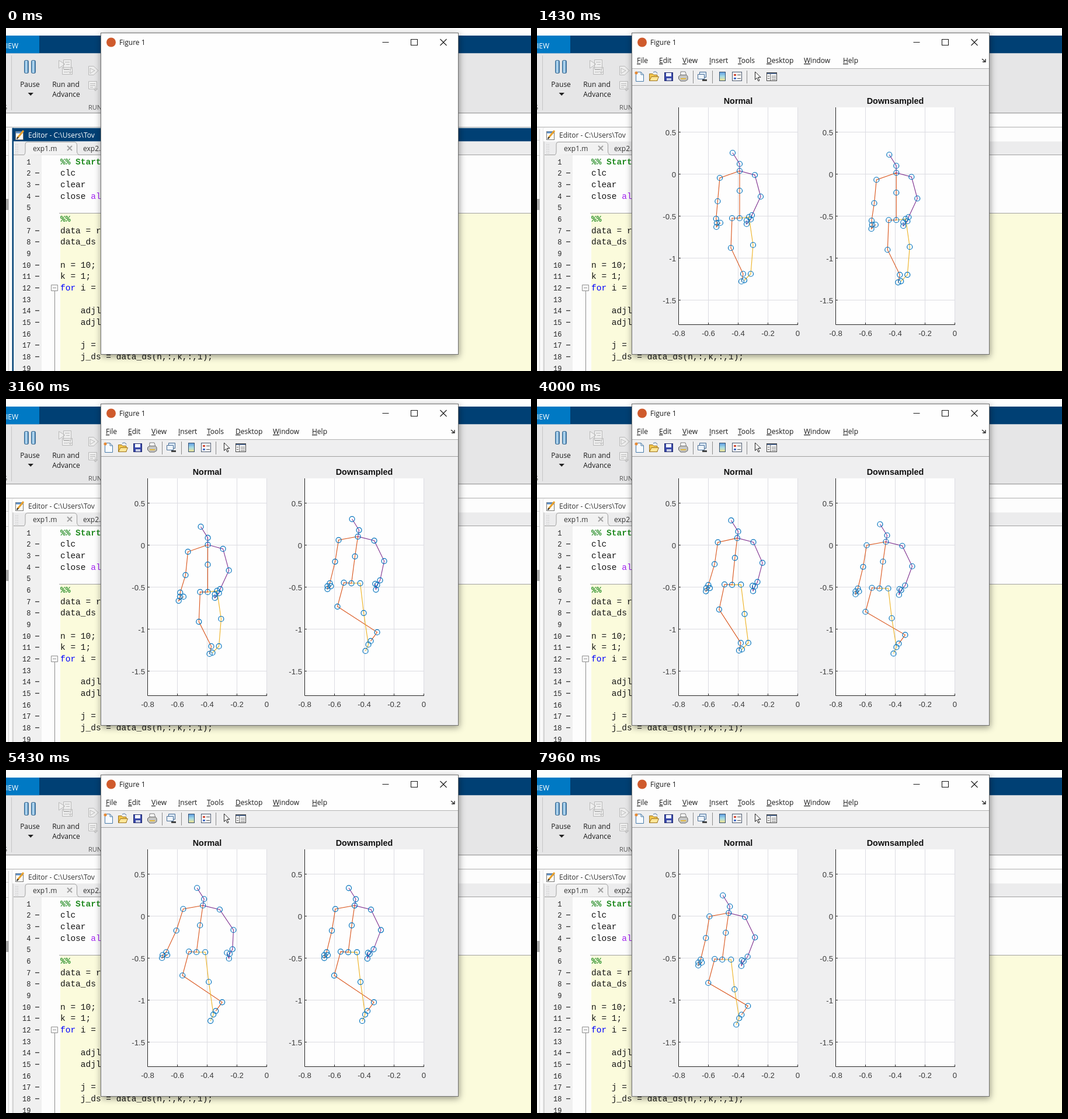
An HTML page that plays this animation: 899 px wide and 588 px high, repeating every 8 s.

```html
<!DOCTYPE html>
<html lang="en">
<head>
<meta charset="utf-8">
<title>Skeleton playback</title>
<style>
html, body { margin: 0; width: 100%; height: 100%; overflow: hidden; background: #fdfdfd; }
svg { display: block; width: 899px; height: 588px; }
text { white-space: pre; }
.ui { font: 12px "Open Sans", "Noto Sans", sans-serif; fill: #1a1a1a; }
.mid { text-anchor: middle; }
.code { font: 14.5px "Liberation Mono", monospace; fill: #151515; }
.num { font: 12px "Liberation Mono", monospace; fill: #222; text-anchor: end; }
.tick { font: 13.2px "Liberation Sans", sans-serif; fill: #3c3c3c; }
.title { font: bold 14.4px "Liberation Sans", sans-serif; fill: #111; text-anchor: middle; }
.bone, .joint { fill: none; stroke-width: 1.1; }
.joint { stroke: #0072bd; stroke-width: 1.2; }
</style>
</head>
<body>
<svg viewBox="0 0 899 588">
  <defs>
    <linearGradient id="bar"><stop stop-color="#3f86bd"/><stop offset=".45" stop-color="#cbe8fa"/><stop offset="1" stop-color="#2f6fa5"/></linearGradient>
    <linearGradient id="spectrum" x2="0" y2="1"><stop stop-color="#5d9be0"/><stop offset=".5" stop-color="#a5dbe6"/><stop offset="1" stop-color="#f4e28a"/></linearGradient>
    <filter id="shadow" x="-10%" y="-10%" width="120%" height="120%"><feDropShadow dx="1" dy="3" stdDeviation="6" flood-opacity=".42"/></filter>
  </defs>

  <rect width="899" height="588" fill="#fdfdfd"/>
  <rect y="13" width="899" height="30.5" fill="#004074"/>
  <rect y="13" width="57" height="30.5" fill="#0079c4"/>
  <text class="ui" x="0" y="35" style="fill:#fff">IEW</text>
  <rect y="43.5" width="899" height="101.5" fill="#e6e6e7"/>
  <path d="M9.5 47V141" stroke="#c6c6c6"/>
  <path d="M0 145.500H899" stroke="#a2a2a2"/><path d="M0 146.500H899" stroke="#dcdcdc"/>
  <path d="M0 170H899" stroke="#d2d2d2" stroke-width="2"/>
  <g fill="url(#bar)" stroke="#39678d">
    <rect x="31.5" y="55.5" width="7" height="22" rx="2"/><rect x="43.5" y="55.5" width="7" height="22" rx="2"/>
  </g>
  <g class="ui mid">
    <text x="41" y="101">Pause</text><text x="102.500" y="101">Run and</text><text x="103" y="118">Advance</text>
  </g>
  <path d="M37.500 111H47L42.200 116Z" fill="#222"/>
  <g fill="#eee" stroke="#b9b9b9">
    <path d="M98.500 54.500H111.500V70.500H98.500ZM90.500 55.500L101 62L90.500 69ZM96.500 67.500H113.500V79.500H96.500ZM101 58.500H109M103 62.500H109M99 71.500H108M99 75.500H106"/>
    <path d="M110 70V77M106.500 74L110 78L113.500 74" fill="none"/>
    <path d="M141.500 65.500H150L158 73L150 80.500H141.500ZM144 69L152 73L144 78Z"/>
    <path d="M141.500 91.500H155.500V104.500H141.500ZM144 95.500H153M144 98.500H153M144 101.500H149M153 100V108M150 104L153 108L157 104"/>
  </g>
  <g class="ui" style="font-size:11px;fill:#555"><text x="141" y="139.500">RUN</text><text x="-4" y="139.500">S</text></g>

  <rect y="171" width="10" height="417" fill="#fafafa"/>
  <path d="M4.500 173V588M0 192.500H4M0 218.500H4" stroke="#cfcfcf"/>
  <rect y="293" width="4.500" height="19" fill="#a9a9a9"/>
  <rect id="frame" x="10.500" y="171.500" width="2.500" height="417"/>
  <rect id="bannerBg" x="11" y="171.500" width="888" height="23"/>
  <rect x="16.500" y="177.500" width="13" height="14" fill="#fbfbf5" stroke="#777"/>
  <path d="M17 179H29" stroke="#5c8ec4" stroke-width="3"/>
  <path d="M20 188L30 176" stroke="#e8a02c" stroke-width="3"/>
  <path d="M18.500 190L21 187" stroke="#333" stroke-width="2"/>
  <text class="ui" id="banner" x="38" y="188">Editor - C:\Users\Tov</text>
  <rect x="13" y="194.500" width="886" height="23" fill="#ececed"/>
  <path d="M17 199V215M20 199V215" stroke="#aaa" stroke-dasharray="1 2"/>
  <path d="M13 217.500H899" stroke="#a0a0a0"/>
  <path d="M30 218Q33 217 33 211V199Q33 195.500 37 195.500H117Q121.500 196 121.500 201V212Q122 217 126 217.500" fill="#f2f2f2" stroke="#a0a0a0"/>
  <path d="M105 202L113 210M113 202L105 210" stroke="#a2a2a2" stroke-width="2"/>
  <g class="ui" style="fill:#333"><text x="46" y="211">exp1.m</text><text x="132" y="211">exp2.m</text></g>
  <rect x="13" y="218" width="48" height="370" fill="#f0f0f0"/>
  <rect x="93" y="318" width="806" height="270" fill="#fbfbdc"/>
  <path d="M91 317.500H899" stroke="#a0a0a0"/>
  <g id="code"></g>
  <path d="M83.500 451V588M77.500 440.500H88.500V450.500H77.500ZM80 445.500H86" fill="#fff" stroke="#8c8c8c"/>

  <rect x="162.500" y="8.500" width="612" height="551" fill="#fefefe" stroke="#707070" filter="url(#shadow)"/>
  <circle cx="180" cy="24.500" r="8" fill="#cf5a2c"/>
  <text class="ui" x="194" y="29">Figure 1</text>
  <path d="M644.500 24.500H655.500M693.500 19.500H704.500V29.500H693.500ZM743.500 19L754.500 30M754.500 19L743.500 30" fill="none" stroke="#1c1c1c" stroke-width="1.100"/>

  <g id="chrome">
    <rect x="163" y="70" width="611" height="489" fill="#efeff0"/>
    <path d="M163 69.500H774" stroke="#b4b4b4"/><path d="M163 98.500H774" stroke="#a0a0a0"/>
    <g class="ui" id="menu"></g>
    <path d="M762 53L767 57M768 53V58H763" fill="none" stroke="#222" stroke-width="1.300"/>
    <path d="M267.500 73V95M300.500 73V95M359.500 73V95" stroke="#8c8c8c"/>
    <path d="M169.500 75.500H178L182.500 80V91.500H169.500ZM178 75.500V80H182" fill="#f7fbff" stroke="#477aa8"/>
    <circle cx="170" cy="77" r="2.500" fill="#e58a36"/>
    <path d="M192.500 90.500V78.500H198L200 80.500H206V90.500Z" fill="#f1c44d" stroke="#9d7520"/>
    <path d="M192.500 90.500L196 83.500H208.500L205.500 90.500Z" fill="#ffe698" stroke="#9d7520"/>
    <path d="M199 76Q204 73 206 78" fill="none" stroke="#49719d"/>
    <rect x="218.500" y="76.500" width="14" height="14" fill="#3848ab" stroke="#222b6d"/><path d="M221 77H230V83H221Z" fill="#f3f6ff"/><path d="M222 86H230V90H222Z" fill="#c7cce4"/>
    <path d="M246 82V75H254L256 82" fill="#fff" stroke="#777"/><path d="M242.500 83L246 80.500H256L258 83V88.500L254 91H246L242.500 87Z" fill="#c6c6c4" stroke="#666"/><path d="M246 87H255" stroke="#e3b93e" stroke-width="2"/>
    <path d="M278.500 75.500H289.500V84.500H278.500Z" fill="#dce9f7" stroke="#456b94"/><path d="M275.500 79.500H286.500V87.500H275.500Z" fill="#eef4fb" stroke="#456b94"/><path d="M283 89.500H291" stroke="#444" stroke-width="3"/>
    <rect x="312.500" y="75.500" width="10" height="15" fill="url(#spectrum)" stroke="#35516f"/>
    <rect x="334.500" y="75.500" width="16" height="15" fill="#fafafa" stroke="#4c5a70"/><path d="M337 79H341V82H337Z" fill="#d34c37"/><path d="M337 85H341V88H337Z" fill="#4970c7"/><path d="M343 80.500H349M343 86.500H349" stroke="#555"/>
    <path d="M373.500 75V88.500L376.500 85.500L379 91L381 90L378.500 84.500H383Z" fill="#fff" stroke="#222"/>
    <rect x="393.500" y="76.500" width="17" height="14" fill="#fff" stroke="#444"/><path d="M394 78H410" stroke="#526b91" stroke-width="2"/><path d="M399.500 79V90M401.500 82.500H409M401.500 85.500H409M401.500 88.500H409M395 82.500H398M395 86.500H398" stroke="#666"/>
  </g>
  <g id="plots"></g>
</svg>
<script>
const LOOP = 8000, OPENS = 60, AXES_AT = 150, FAST_ENDS = 6930;
const PLOT_GAP = 269, REDRAWS = 47, STEP = 7900 / REDRAWS;
const byId = id => document.getElementById(id);

function add(parent, tag, attrs, text) {
  const el = document.createElementNS(parent.namespaceURI, tag);
  for (const name in attrs) el.setAttribute(name, attrs[name]);
  if (text !== undefined) el.textContent = text;
  return parent.appendChild(el);
}

// Editor: a coloured span is written as {ink|text}.
const code = ["{g|%% Start}", "clc", "clear", "close {p|all}", "", "{g|%%}", "data = r", "data_ds ", "",
  "n = 10;", "k = 1;", "{b|for} i = ", "", "    adjl", "    adjl", "", "    j = ", "    j_ds = data_ds(n,:,k,:,1);", ""];
const inks = { g: "fill:#228b22;font-weight:bold", p: "fill:#a020f0", b: "fill:#0000ff" };
code.forEach((line, i) => {
  const y = 233.5 + i * 19.67, rows = byId("code");
  add(rows, "text", { class: "num", x: 42.5, y }, i + 1);
  if (line && !line.includes("%%")) add(rows, "path", { d: `M50 ${Math.round(y - 5) + .5}h7`, stroke: "#333", "stroke-width": 1.3 });
  const text = add(rows, "text", { class: "code", x: 93, y });
  for (const part of line.split(/(\{.*?\})/)) {
    const marked = part.match(/^\{(.)\|(.*)\}$/);
    add(text, "tspan", marked ? { style: inks[marked[1]] } : {}, marked ? marked[2] : part);
  }
});

const menu = { File: 171, Edit: 209, View: 249, Insert: 295, Tools: 344, Desktop: 393, Window: 457, Help: 524 };
for (const word in menu) {
  const item = add(byId("menu"), "text", { x: menu[word], y: 60 });
  add(item, "tspan", { "text-decoration": "underline" }, word[0]);
  add(item, "tspan", {}, word.slice(1));
}

function makePlot(title, dx) {
  const g = add(byId("plots"), "g", { transform: `translate(${dx} 0)` });
  add(g, "rect", { x: 242, y: 136, width: 205, height: 373, fill: "#fefefe" });
  let grid = "", ticks = "M242.5 136V508.5H447";
  for (let i = 0; i < 5; i++) {
    const x = 242.5 + 51 * i, y = 178.5 + 72 * i;
    if (i) grid += `M${x} 136V508`;
    grid += `M243 ${y}H447`;
    ticks += `M${x} 508v-3M242 ${y}h4`;
    add(g, "text", { class: "tick mid", x, y: 528 }, +(-.8 + .2 * i).toFixed(1) || 0);
    add(g, "text", { class: "tick", x: 238, y: y + 5, "text-anchor": "end" }, .5 - .5 * i);
  }
  add(g, "path", { d: grid, stroke: "#dcdce2" });
  add(g, "path", { d: ticks, fill: "none", stroke: "#262626" });
  add(g, "text", { class: "title", x: 344.5, y: 130 }, title);
  const body = add(g, "g", {});
  const bones = ["#d95319", "#edb120", "#7e2f8e"].map(stroke => add(body, "path", { class: "bone", stroke }));
  return { body, bones, joints: add(body, "path", { class: "joint" }) };
}

// Two key poses, as joint offsets from the chest.
const standing = {
  spine: [[-12, -31], [0, -12], [0, 0], [0, 34], [0, 81]],
  armL: [[-34, 12], [-38, 52], [-46, 82], [-46, 89], [-48, 96], [-40, 89]],
  armR: [[26, 7], [36, 44], [21, 76], [19, 83], [12, 91], [12, 85]],
  legL: [[-13, 81], [-15, 132], [6, 179], [3, 192]],
  legR: [[16, 79], [23, 127], [19, 179], [8, 190]],
};
const balancing = {
  spine: [[-10, -30], [2, -11], [0, 0], [-5, 34], [-11, 80]],
  armL: [[-33, 6], [-39, 43], [-48, 80], [-52, 85], [-52, 90], [-46, 85]],
  armR: [[28, 7], [45, 42], [35, 75], [29, 83], [26, 91], [26, 81]],
  legL: [[-24, 79], [-35, 120], [33, 162], [22, 177]],
  legR: [[4, 80], [10, 131], [18, 183], [13, 194]],
};
const chestHeights = [[2130, 245], [3160, 250], [4200, 236], [5100, 232], [6260, 236], [7960, 245], [9400, 244], [10600, 232], [12460, 239]];

const mix = (a, b, k) => a + (b - a) * k;
const ease = k => (k = Math.min(1, Math.max(0, k))) * k * (3 - 2 * k);
const chestX = s => 347 - 19 * ease((s - 2000) / 6400);
const chestY = s => chestHeights.reduce((y, [at, to], i) => i ? mix(y, to, ease((s - chestHeights[i - 1][0]) / (at - chestHeights[i - 1][0]))) : to, 0);

function limbAt(name, s) {
  const shift = ease((s - 3000) / 1300), lift = ease((s - 3900) / 700);
  const isArm = name.startsWith("arm");
  const swing = !isArm ? 0 : name === "armL"
    ? 12 * Math.sin((s - 1000) * Math.PI / 2000) * (1 - shift)
    : 7 * Math.cos((s - 5000) * Math.PI / 4200) * shift;
  const reach = isArm ? .35 * Math.exp(-(((s - 5300) / 350) ** 2)) : 0;
  return standing[name].map(([x0, y0], i) => {
    const [x1, y1] = balancing[name][i];
    const isFoot = y0 > 150, k = isFoot ? lift : shift;
    const y = mix(y0, y1, k);
    const x = (mix(x0, x1, k) + swing * Math.max(0, y - 50) / 40) * (1 + reach * y / 90);
    return [chestX(s) + x, y + (isFoot ? (chestY(s) + 240) / 2 : chestY(s))];
  });
}

function drawBody(plot, s) {
  const limbs = Object.keys(standing).map(name => limbAt(name, s));
  const [spine, armL, armR, legL, legR] = limbs;
  const [, , chest, , hip] = spine;
  const line = (...points) => "M" + points.join(" ");
  plot.bones[0].setAttribute("d", line(chest, ...armL) + line(...spine.slice(2), ...legL));
  plot.bones[1].setAttribute("d", line(hip, ...legR));
  plot.bones[2].setAttribute("d", line(...spine.slice(0, 3), ...armR));
  plot.joints.setAttribute("d", limbs.flat().map(([x, y]) => `M${x - 4.5} ${y}a4.5 4.5 0 1 0 9 0a4.5 4.5 0 1 0 -9 0`).join(""));
}

const normal = makePlot("Normal", 0), fast = makePlot("Downsampled", PLOT_GAP);
const show = (el, on) => { el.style.display = on ? "" : "none"; };

function render(t) {
  const opened = t >= OPENS;
  show(byId("chrome"), opened);
  show(byId("plots"), t >= AXES_AT);
  show(fast.body, t < FAST_ENDS);
  byId("bannerBg").setAttribute("fill", opened ? "#fdfdfd" : "#004074");
  byId("frame").setAttribute("fill", opened ? "#d4d4d4" : "#004074");
  byId("banner").style.fill = opened ? "#333" : "#fff";
  const drawn = OPENS + STEP * Math.floor((t - OPENS) / STEP + .01);
  drawBody(normal, drawn);
  drawBody(fast, 2 * drawn - OPENS);
}

const start = performance.now();
function tick() {
  render((performance.now() - start) % LOOP);
  requestAnimationFrame(tick);
}
tick();
</script>
</body>
</html>
```
